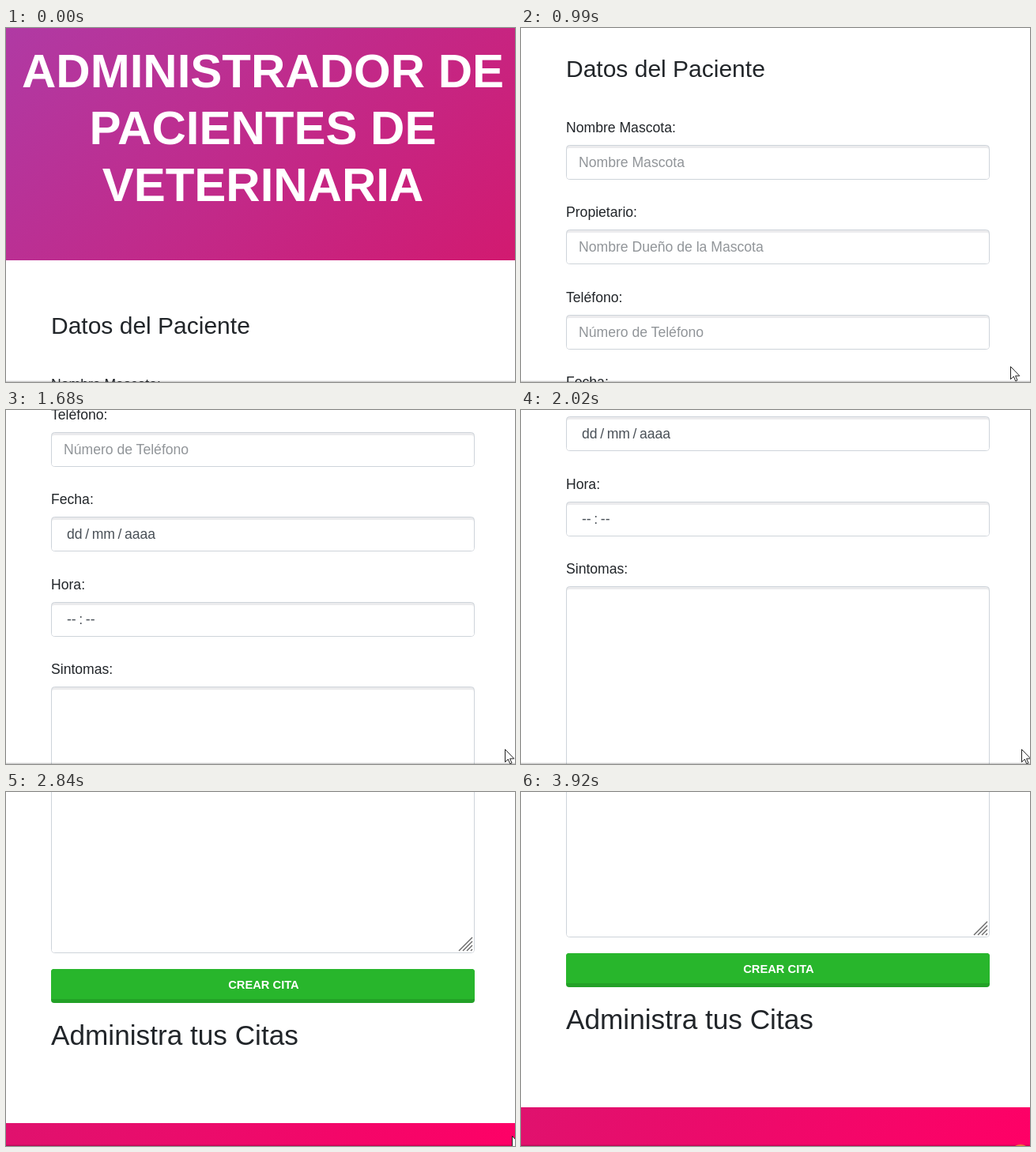
An HTML page that plays this animation: 644 px wide and 448 px high, repeating every 3980 ms.

```html
<!DOCTYPE html>
<html lang="es">
<head>
<meta charset="utf-8">
<title>Administrador de pacientes</title>
<style>
  html, body { margin: 0; width: 100%; height: 100%; overflow: hidden; background: #fff; }
  svg { display: block; }
  text { font-family: "Liberation Sans", Arial, sans-serif; font-size: 17.6px; fill: #212529; white-space: pre; }
  .title { font-size: 60px; font-weight: bold; fill: #fff; text-anchor: middle; }
  .heading { font-size: 30px; }
  .heading.large { font-size: 35.2px; }
  .placeholder { fill: #919599; }
  .value { fill: #495057; word-spacing: -1.3px; }
  .button { font-size: 14.7px; font-weight: bold; fill: #fff; text-anchor: middle; }
</style>
</head>
<body>
<svg width="644" height="448" viewBox="0 0 644 448">
  <defs>
    <linearGradient id="headerFill" gradientUnits="userSpaceOnUse" x1="0" y1="0" x2="469" y2="469">
      <stop stop-color="#b03aa4"/><stop offset="1" stop-color="#d21a70"/>
    </linearGradient>
    <linearGradient id="footerFill" gradientUnits="userSpaceOnUse" x1="0" y1="1475" x2="346" y2="1821">
      <stop stop-color="#df126e"/><stop offset="1" stop-color="#f06"/>
    </linearGradient>
  </defs>
  <g id="page">
    <rect width="644" height="294" fill="url(#headerFill)"/>
    <rect y="1475" width="644" height="60" fill="url(#footerFill)"/>
    <path d="M573 1257L590 1240M578 1257L590 1245M583 1257L590 1250M588 1257L590 1255" stroke="#666" stroke-width="1.4"/>
    <rect x="57" y="1280" width="536" height="43" rx="4" fill="#23a127"/>
    <path d="M57 1318V1284a4 4 0 0 1 4-4H589a4 4 0 0 1 4 4V1318Z" fill="#28b62c"/>
  </g>
  <rect y="446" width="644" height="1" fill="#000" opacity=".07"/>
  <rect y="447" width="644" height="1" fill="#000" opacity=".2"/>
  <circle id="click" cx="632" cy="459" r="13" fill="#f0b030" opacity=".7"/>
  <path id="cursor" d="M.5 .5V16.5L4.3 13L6.8 18.8L9 17.8L6.6 12.2H11.8Z" fill="#fff" stroke="#222"/>
</svg>
<script>
const LOOP = 3980;
const page = document.getElementById('page');
const cursor = document.getElementById('cursor');
const click = document.getElementById('click');

function add(tag, attributes, content = '') {
  const node = document.createElementNS('http://www.w3.org/2000/svg', tag);
  for (const name in attributes) node.setAttribute(name, attributes[name]);
  node.textContent = content;
  page.insertBefore(node, tag === 'rect' ? page.firstChild.nextSibling : null);
  return node;
}

const label = (content, x, y, className = '') => add('text', { x, y, class: className }, content);

function field(name, top, height, content, className, x) {
  // Inner face goes in first so the frame, inserted before it, lies beneath.
  add('rect', { x: 58, y: top + 4, width: 534, height: height - 5, rx: 3, fill: '#fff' });
  add('rect', { x: 57.5, y: top + .5, width: 535, height: height - 1, rx: 4, fill: '#ebebed', stroke: '#ced4da' });
  label(name, 57, top - 16);
  if (content) label(content, x, top + 28, className);
}

['ADMINISTRADOR DE', 'PACIENTES DE', 'VETERINARIA'].forEach((line, i) => label(line, 325, 75 + 72 * i, 'title'));
label('Datos del Paciente', 57, 387, 'heading');
field('Nombre Mascota:', 473, 44, 'Nombre Mascota', 'placeholder', 73);
field('Propietario:', 580, 44, 'Nombre Dueño de la Mascota', 'placeholder', 73);
field('Teléfono:', 688, 44, 'Número de Teléfono', 'placeholder', 73);
field('Fecha:', 795, 44, 'dd / mm / aaaa', 'value', 77);
field('Hora:', 903, 44, '-- : --', 'value', 77);
field('Sintomas:', 1010, 250);
label('CREAR CITA', 326, 1305, 'button');
label('Administra tus Citas', 57, 1376, 'heading large');

// Screen updates come in bursts: first time, last time, count.
const bursts = [
  [120, 320, 4], [520, 720, 4], [920, 1400, 8], [1470, 1680, 4], [1880, 2230, 6],
  [2430, 2910, 7], [2980, 2980, 1], [3130, 3450, 6], [3650, 3650, 1], [3920, 3920, 1],
];
const updates = [0];
for (const [first, last, count] of bursts)
  for (let i = 0; i < count; i++)
    updates.push(Math.round((first + (last - first) * i / Math.max(1, count - 1)) / 10) * 10);

// Wheel turns: start, end, distance.
const turns = [
  [454, 720, 264], [895, 1095, 132], [1095, 1390, 132], [1390, 1680, 132],
  [1820, 2230, 264], [2450, 2830, 132], [3080, 3450, 20],
];
const smooth = p => p * p * (3 - 2 * p);
const progress = (t, start, end) => Math.min(1, Math.max(0, (t - start) / (end - start)));
const scrollAt = t => turns.reduce((y, [start, end, distance]) => y + distance * smooth(progress(t, start, end)), 0);

// Pointer path: time, x, y.
const path = [
  [0, 618, 450], [60, 618, 450], [320, 618, 427], [590, 618, 427], [990, 619, 428],
  [1680, 631, 429], [2430, 635, 430], [2830, 640, 435], [2910, 641, 435],
  [2980, 645, 435], [3450, 650, 460], [3650, 637, 445], [3920, 632, 450], [LOOP, 632, 450],
];
function pointerAt(t) {
  const i = path.findIndex(key => key[0] > t);
  const [from, to] = [path[i - 1], path[i]];
  const p = progress(t, from[0], to[0]);
  return [1, 2].map(k => Math.round(from[k] + (to[k] - from[k]) * p));
}

function draw(now) {
  const time = now % LOOP;
  const t = updates.filter(u => u <= time).pop();
  page.setAttribute('transform', `translate(0 ${-Math.round(scrollAt(t))})`);
  cursor.setAttribute('transform', `translate(${pointerAt(t)})`);
  click.setAttribute('visibility', t >= 3920 ? 'visible' : 'hidden');
}

const begin = performance.now();
function tick() {
  draw(performance.now() - begin);
  requestAnimationFrame(tick);
}
tick();
</script>
</body>
</html>
```
